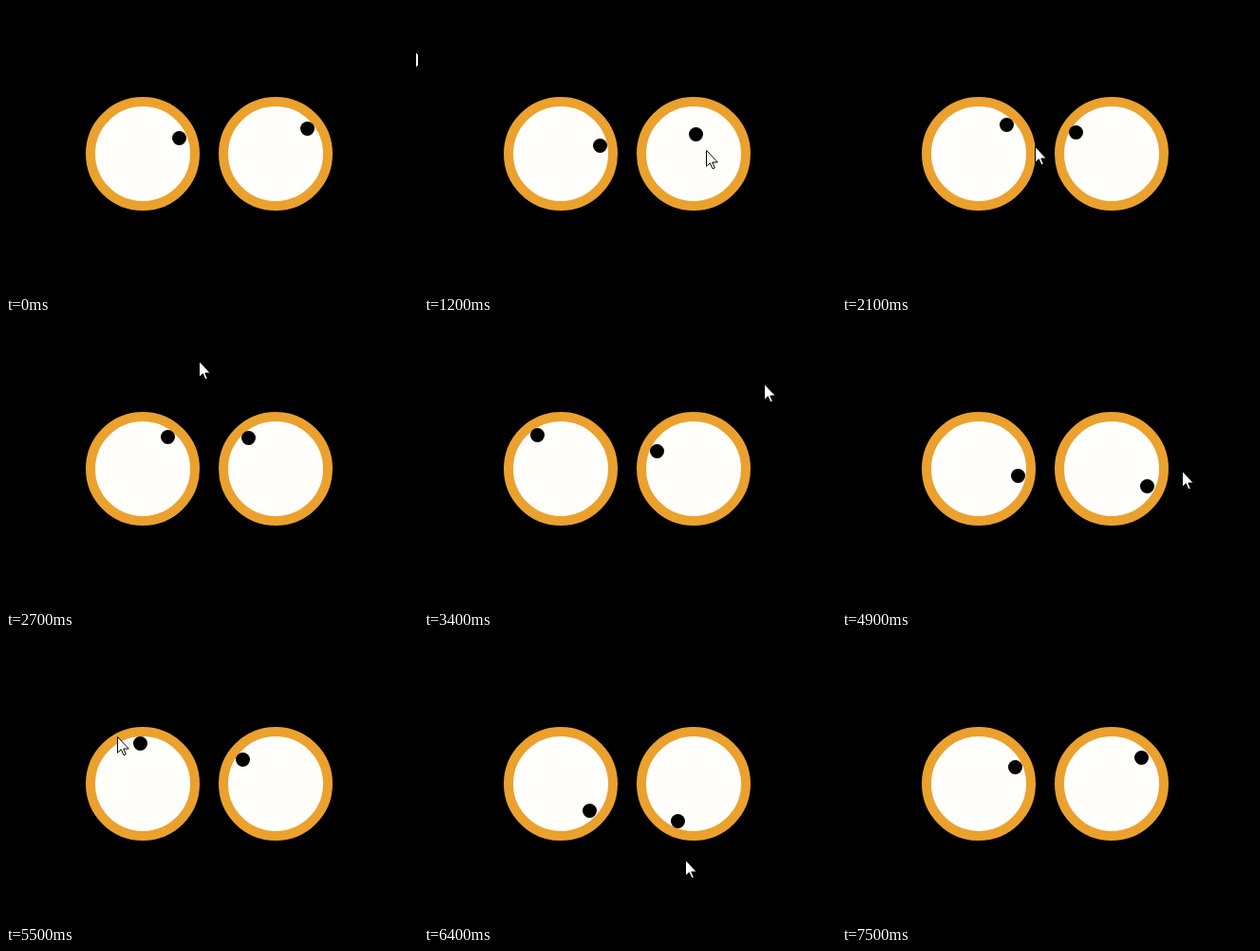
Recreate the animation shown at these times as an HTML page. Size 434x303 px, loop 7.8 s.

```html
<!DOCTYPE html>
<html lang="en">
<head>
<meta charset="utf-8">
<title>Eyes following the pointer</title>
<style>
  html, body { margin: 0; width: 100%; height: 100%; overflow: hidden; background: #000; }
  svg { display: block; width: 434px; height: 303px; }
  .eye { fill: #fffefa; stroke: #eba12e; stroke-width: 10; }
  #pointer { fill: #fff; stroke: #000; }
</style>
</head>
<body>
<svg viewBox="0 0 434 303">
  <circle class="eye" cx="144" cy="156" r="55"/>
  <circle class="eye" cx="284" cy="156" r="55"/>
  <circle class="pupil" r="7.5"/>
  <circle class="pupil" r="7.5"/>
  <path id="pointer" d="M.5 .5V17.3L4.3 13.7L7 19.8L9.3 18.8L6.8 13H12.3Z"/>
</svg>
<script>
  const STEP = 100, LOOP = 7800, LAST = 75;
  const RADIUS = 7.5, REACH = 42.5, PULL = 0.7;
  const centers = [[144, 156], [284, 156]];

  // Turning points of the pointer: step, x, y
  const path = [
    [-1, 452, 28], [1, 407, 67], [7, 238, 158], [11, 288, 127], [12, 297, 152],
    [15, 288, 182], [19, 196, 51], [20, 196, 104], [21, 203, 148], [23, 208, 202],
    [27, 203, 42], [33, 75, 57], [34, 358, 66], [35, 407, 75], [40, 60, 118],
    [42, 68, 212], [43, 104, 245], [45, 225, 265], [48, 366, 196], [52, 255, 40],
    [54, 138, 48], [55, 117, 106], [60, 140, 258], [64, 275, 236], [72, 383, 38],
    [73, 383, 38], [74, 435, 28], [75, 452, 28]
  ];

  const pupils = document.querySelectorAll('.pupil');
  const pointer = document.getElementById('pointer');

  function slope(k, axis) {
    const a = path[Math.max(k - 1, 0)];
    const b = path[Math.min(k + 1, path.length - 1)];
    return (b[axis] - a[axis]) / (b[0] - a[0]);
  }

  // Smooth curve through the turning points
  function pointerAt(step) {
    let k = 0;
    while (k < path.length - 2 && path[k + 1][0] <= step) k++;
    const a = path[k], b = path[k + 1];
    const span = b[0] - a[0], u = (step - a[0]) / span;
    return [1, 2].map(axis => {
      const ease = u * u * (3 - 2 * u);
      const out = u * (1 - u) * (1 - u) * span * slope(k, axis);
      const into = u * u * (u - 1) * span * slope(k + 1, axis);
      return a[axis] + (b[axis] - a[axis]) * ease + out + into;
    });
  }

  // Pupils sit on whole pixels
  const snap = v => Math.floor(v - RADIUS) + RADIUS;

  function draw() {
    const step = Math.min(LAST, Math.floor(performance.now() % LOOP / STEP));
    const [px, py] = pointerAt(step).map(Math.round);
    pointer.setAttribute('transform', `translate(${px} ${py})`);

    // The eyes trail the pointer by one step
    const [tx, ty] = pointerAt(step - 1);
    centers.forEach(([cx, cy], i) => {
      const dx = tx - cx, dy = ty - cy;
      const scale = Math.min(REACH / Math.hypot(dx, dy), PULL);
      pupils[i].setAttribute('cx', snap(cx + dx * scale));
      pupils[i].setAttribute('cy', snap(cy + dy * scale));
    });
    requestAnimationFrame(draw);
  }
  draw();
</script>
</body>
</html>
```
